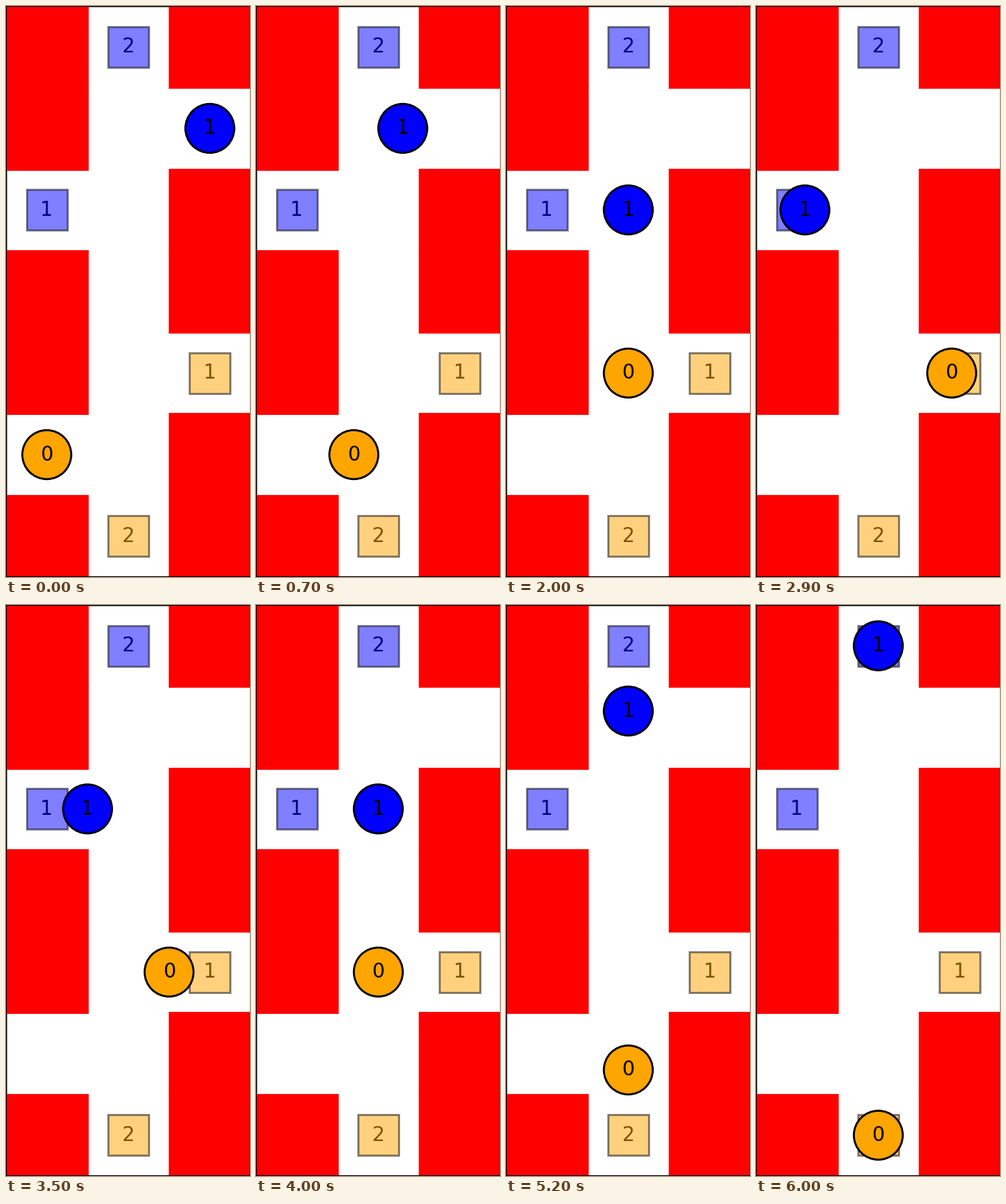
A matplotlib script for the animation above (7 s loop, 342 by 800 pixels).

```python
import numpy as np
import matplotlib.pyplot as plt
from matplotlib.animation import FuncAnimation
from matplotlib.patches import Circle, Rectangle

WIDTH, HEIGHT, DPI = 342, 800, 200
COLS, ROWS = 3, 7
STEP_MS, FRAMES = 100, 70

WALLS = [(0, y) for y in (0, 2, 3, 5, 6)] + [(2, y) for y in (0, 1, 3, 4, 6)]

# name, colour, one cell per second, goal cells in visiting order
AGENTS = [
    ("0", "orange",
     [(0, 1), (1, 1), (1, 2), (2, 2), (1, 2), (1, 1), (1, 0)],
     [(2, 2), (1, 0)]),
    ("1", "blue",
     [(2, 5), (1, 5), (1, 4), (0, 4), (1, 4), (1, 5), (1, 6)],
     [(0, 4), (1, 6)]),
]

plt.rcParams["font.family"] = "DejaVu Sans"
fig = plt.figure(figsize=(WIDTH / DPI, HEIGHT / DPI), dpi=DPI, facecolor="white")
# square cells that fill the height; the last column runs just past the edge
ax = fig.add_axes([0, 0, HEIGHT * COLS / ROWS / WIDTH, 1])
ax.set(xlim=(-0.5, COLS - 0.5), ylim=(-0.5, ROWS - 0.5), xticks=[], yticks=[])


def box(x, y, w, h, **style):
    ax.add_patch(Rectangle((x - w / 2, y - h / 2), w, h, linewidth=1, **style))


def label(x, y, text, zorder):
    return ax.text(x, y, text, fontsize=10, color="black",
                   ha="center", va="center", zorder=zorder)


box((COLS - 1) / 2, (ROWS - 1) / 2, COLS, ROWS,
    facecolor="none", edgecolor="gray", zorder=1)
for x, y in WALLS:
    box(x, y, 1, 1, facecolor="red", edgecolor="red", zorder=1)

movers = []
for name, color, path, goals in AGENTS:
    for number, (x, y) in enumerate(goals, 1):
        # the translucent square tints the digit beneath it
        label(x, y, str(number), 1.2)
        box(x, y, 0.5, 0.5, facecolor=color, edgecolor="black",
            alpha=0.5, zorder=1.5)
    disc = ax.add_patch(Circle(path[0], 0.3, facecolor=color,
                               edgecolor="black", linewidth=1, zorder=2))
    movers.append((disc, label(*path[0], name, 3), np.array(path, float)))


def update(frame):
    t = frame * STEP_MS / 1000
    for disc, text, path in movers:
        beats = np.arange(len(path))
        pos = [np.interp(t, beats, path[:, k]) for k in (0, 1)]
        disc.center = pos
        text.set_position(pos)
    return [artist for mover in movers for artist in mover[:2]]


anim = FuncAnimation(fig, update, frames=FRAMES, interval=STEP_MS,
                     repeat=True, repeat_delay=0, blit=False)
plt.show()
```
